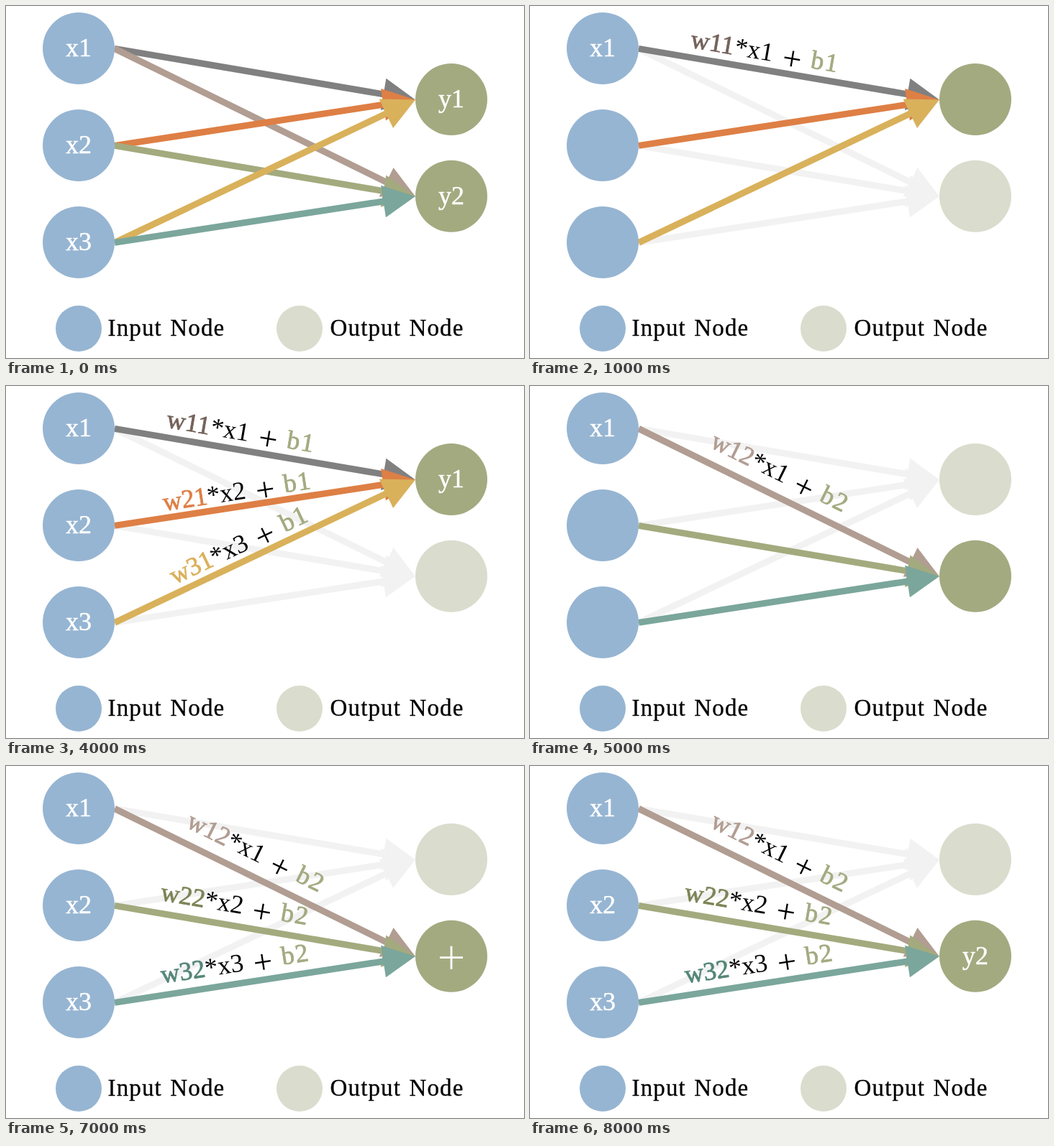
Animation, 720 px wide and 490 px high, one loop 9000 ms. Source, as an HTML page:

```html
<!DOCTYPE html>
<html lang="en">
<head>
<meta charset="utf-8">
<title>Weighted sums in a layer</title>
<style>
  html, body { margin: 0; width: 100%; height: 100%; overflow: hidden; background: #fff; }
  svg { display: block; width: 720px; height: 490px; }
  text { font: 36px "Liberation Serif", "Times New Roman", serif; }
  .node text { fill: #fff; stroke: #fff; stroke-width: .5; text-anchor: middle; }
  .legend { font-size: 33px; letter-spacing: 1.15px; word-spacing: 2px; stroke: #000; stroke-width: .3; }
  .strong { stroke-width: .8; }
  .bias { letter-spacing: 1.5px; }
  .plus { font-size: 47px; }
</style>
</head>
<body>
<svg id="stage" viewBox="0 0 720 490"></svg>
<script>
const BLUE = '#96b5d2', OLIVE = '#a3aa80', PALE = '#dadccd', FAINT = '#f2f2f2';
const STEP_MS = 1000, STEPS = 9, ROUND = 4;
const IN = { x: 101, ys: [59, 194, 329] };
const OUT = { x: 619, ys: [130, 264.7] };
const RADIUS = 50;

// Listed in painting order; at is the start of the label's baseline.
const links = [
  { from: 0, to: 0, color: '#808080', ink: '#75625a', at: [222, 57.5] },
  { from: 0, to: 1, color: '#b19d92', ink: '#b19d92', at: [249, 84.5] },
  { from: 1, to: 0, color: '#de7f45', ink: '#de7f45', at: [220, 174] },
  { from: 1, to: 1, color: '#a3aa7e', ink: '#7d8456', at: [213.7, 186.7] },
  { from: 2, to: 0, color: '#d9b15b', ink: '#d9b15b', at: [234.5, 276.5] },
  { from: 2, to: 1, color: '#7ba69b', ink: '#548678', at: [217, 302.6] }
];

const stage = document.getElementById('stage');

function add(parent, tag, attrs = {}, content = '') {
  const el = document.createElementNS('http://www.w3.org/2000/svg', tag);
  for (const key in attrs) el.setAttribute(key, attrs[key]);
  el.textContent = content;
  return parent.appendChild(el);
}

function show(el, visible) {
  el.setAttribute('visibility', visible ? 'visible' : 'hidden');
}

function addArrow(parent, { from, to }, color) {
  const x = IN.x + RADIUS, y = IN.ys[from] + 0.4;
  const dx = OUT.x - RADIUS - x, dy = OUT.ys[to] + 0.4 - y;
  const length = Math.hypot(dx, dy);
  const angle = Math.atan2(dy, dx) * 180 / Math.PI;
  const neck = length - 45;
  add(parent, 'path', {
    d: `M0-4.5H${neck}V-22.5L${length} 0L${neck} 22.5V4.5H0Z`,
    transform: `translate(${x} ${y}) rotate(${angle})`,
    fill: color
  });
  return angle;
}

function addLabel(parent, { from, to, ink, at }, angle) {
  const g = add(parent, 'g', { transform: `translate(${at}) rotate(${angle})` });
  add(g, 'text', { class: 'strong', fill: ink, stroke: ink }, `w${from + 1}${to + 1}`);
  add(g, 'text', { x: 62 }, `*x${from + 1}`);
  add(g, 'text', { x: 143, y: 7.5, class: 'plus', 'text-anchor': 'middle' }, '+');
  add(g, 'text', { x: 169.5, class: 'strong bias', fill: OLIVE, stroke: OLIVE }, `b${to + 1}`);
  return g;
}

function addNode(x, y, fill, name) {
  const g = add(stage, 'g', { class: 'node' });
  const disc = add(g, 'circle', { cx: x, cy: y, r: RADIUS, fill });
  const text = add(g, 'text', { x, y: y + 11 }, name);
  return { g, disc, text };
}

function addLegend(x, color, textX, name) {
  add(stage, 'circle', { cx: x, cy: 449, r: 32, fill: color });
  add(stage, 'text', { x: textX, y: 459, class: 'legend' }, name);
}

const faintLayer = add(stage, 'g');
const arrowLayer = add(stage, 'g');
const labelLayer = add(stage, 'g');

for (const link of links) {
  link.faint = add(faintLayer, 'g');
  link.arrow = add(arrowLayer, 'g');
  addArrow(link.faint, link, FAINT);
  const angle = addArrow(link.arrow, link, link.color);
  link.label = addLabel(labelLayer, link, angle);
}

const inputs = IN.ys.map((y, i) => addNode(IN.x, y, BLUE, `x${i + 1}`));
const outputs = OUT.ys.map((y, i) => {
  const node = addNode(OUT.x, y, OLIVE, `y${i + 1}`);
  node.plus = add(node.g, 'path', {
    d: `M${OUT.x - 16} ${y + 2}h32m-16-16v32`,
    stroke: '#fff', 'stroke-width': 2.8, fill: 'none'
  });
  return node;
});

addLegend(101, BLUE, 141.5, 'Input Node');
addLegend(408, PALE, 450.5, 'Output Node');

function render(ms) {
  const step = Math.floor(ms / STEP_MS) % STEPS;
  const overview = step === 0;
  const target = Math.floor((step - 1) / ROUND);
  const phase = (step - 1) % ROUND;   // 0..2 add one input each, 3 names the output

  for (const { from, to, faint, arrow, label } of links) {
    const active = overview || to === target;
    show(faint, !active);
    show(arrow, active);
    show(label, !overview && active && from <= phase);
  }
  inputs.forEach(({ text }, i) => show(text, overview || i <= phase));
  outputs.forEach(({ disc, text, plus }, i) => {
    const active = i === target;
    disc.setAttribute('fill', overview || active ? OLIVE : PALE);
    show(text, overview || (active && phase === 3));
    show(plus, !overview && active && (phase === 1 || phase === 2));
  });
}

const start = performance.now();
function tick() {
  render(performance.now() - start);
  requestAnimationFrame(tick);
}
tick();
</script>
</body>
</html>
```
